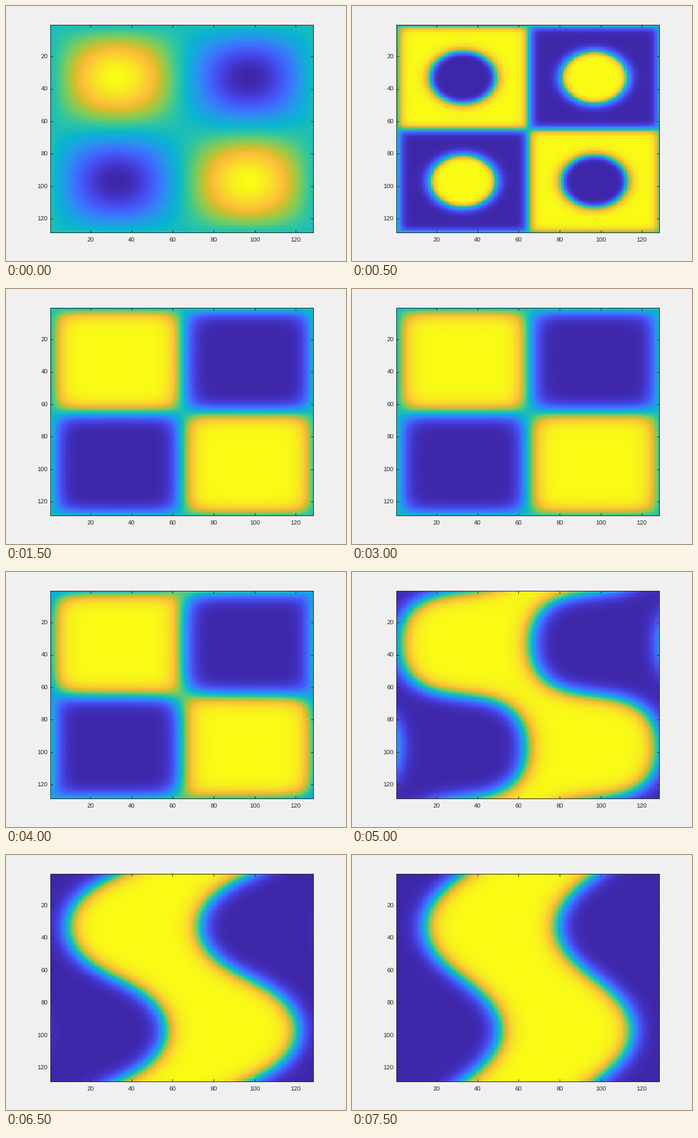
A matplotlib script that plays this animation: 560x420 px, repeating every 8000 ms.

```python
import numpy as np
import matplotlib.pyplot as plt
from matplotlib.animation import FuncAnimation
from matplotlib.colors import LinearSegmentedColormap

W, H, DPI = 560, 420, 100
N = 128            # grid cells per side
FRAMES, INTERVAL = 16, 500
EPS = 3.9          # interface scale in cells
SPAN = 5.0         # model time between two frames
STEPS = 50
DISC = 15.9        # starting radius of the discs in cells
BIAS = 8e-8        # tiny push that breaks the symmetry

PX = 72 / DPI      # one pixel in points
INK = "#262626"

# key colours of the parula ramp
parula = LinearSegmentedColormap.from_list("parula", [
    (0, "#3e26a8"), (1 / 9, "#4747eb"), (2 / 9, "#3e6fff"), (3 / 9, "#2797eb"),
    (4 / 9, "#08b5d0"), (5 / 9, "#31c69f"), (6 / 9, "#81cc59"),
    (7 / 9, "#dcbd29"), (0.84, "#febe3c"), (0.92, "#f7dc2a"), (1, "#f9fb15"),
])

cells = np.arange(N)
angle = 2 * np.pi * cells / N
fold = cells % (N // 2) - N // 4


def checker_with_discs():
    """Four square domains, each holding a disc of the opposite phase."""
    wall = np.tanh(np.sin(angle) * N / (2 * np.pi) / 2.6)
    gap = np.hypot(fold[:, None], fold[None, :]) - DISC
    ring = np.tanh(gap / np.where(gap > 0, 3.2, 2.0))
    return np.outer(wall, wall) * ring - BIAS * np.cos(angle)[None, :]


def solve():
    """Allen-Cahn flow, split into exact diffusion and exact reaction."""
    dt = SPAN / STEPS
    k = 2 * np.pi * np.fft.fftfreq(N)
    spread = np.exp(-dt * EPS ** 2 * (k[:, None] ** 2 + k[None, :] ** 2))
    decay = np.exp(-2 * dt)
    u = checker_with_discs()
    fields = [np.outer(np.sin(angle), np.sin(angle)), u]
    while len(fields) < FRAMES:
        for _ in range(STEPS):
            u = np.fft.ifft2(spread * np.fft.fft2(u)).real
            u = u / np.sqrt(u ** 2 + (1 - u ** 2) * decay)
        fields.append(u)
    return fields


fields = solve()

plt.rcParams.update({"font.family": "Liberation Sans", "text.hinting": "none"})
fig = plt.figure(figsize=(W / DPI, H / DPI), dpi=DPI, facecolor="#f0f0f0")
ax = fig.add_axes([73 / W, 1 - 373 / H, 433 / W, 342 / H])
image = ax.imshow(fields[0], cmap=parula, interpolation="nearest",
                  aspect="auto", extent=(0.5, N + 0.5, N + 0.5, 0.5))

ticks = range(20, N, 20)
ax.set_xticks(ticks)
ax.set_yticks(ticks)
ax.tick_params(direction="in", top=True, right=True, length=4 * PX,
               width=PX, color=INK, labelcolor=INK, labelsize=10.4 * PX)
ax.tick_params(axis="x", pad=8.5 * PX)
ax.tick_params(axis="y", pad=4 * PX)
for spine in ax.spines.values():
    spine.set_linewidth(PX)
    spine.set_color(INK)


def draw(i):
    u = fields[i]
    image.set_data(u)
    image.set_clim(u.min(), u.max())
    return [image]


anim = FuncAnimation(fig, draw, frames=FRAMES, interval=INTERVAL,
                     repeat=True, repeat_delay=0)
plt.show()
```
